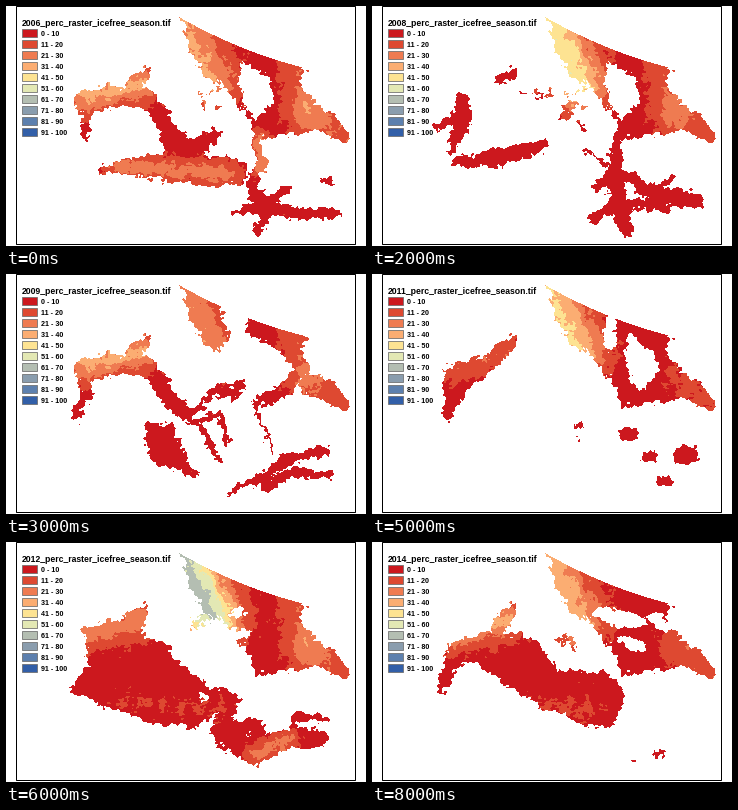
These frames come from a looping animation (360 px wide and 240 px high, 9 s). A matplotlib script:

```python
import numpy as np
import matplotlib.pyplot as plt
from matplotlib.animation import FuncAnimation
from matplotlib.patches import Rectangle
from matplotlib.path import Path

W, H, DPI = 360, 240, 80
PX = 72 / DPI
CLASSES = ["#cc181e", "#de4931", "#ef7b51", "#fbad72", "#fde392",
           "#e3e8b4", "#b4beb2", "#8a9dae", "#5d80ae", "#325fa8"]
PALETTE = np.array([[int(c[i:i + 2], 16) for i in (1, 3, 5)]
                    for c in CLASSES + ["#ffffff"]], dtype=np.uint8)
EMPTY = -1

rng = np.random.default_rng(7)
gx, gy = np.meshgrid(np.arange(W) + 0.5, np.arange(H) + 0.5)


def waves(length, count=24):
    """Smooth noise of unit variance from random plane waves."""
    total = np.zeros(gx.shape)
    for angle, phase in rng.uniform(0, 2 * np.pi, (count, 2)):
        k = 2 * np.pi / (length * rng.uniform(0.7, 1.4))
        total += np.sin(k * (np.cos(angle) * gx + np.sin(angle) * gy) + phase)
    return total * np.sqrt(2 / count)


def rough():
    return 1.0 * waves(26) + 1.0 * waves(11) + 0.8 * waves(5)


# Coasts are simple shapes seen through a rough coordinate grid.
wx, wy = gx + rough(), gy + rough()
cells = np.column_stack([wx.ravel(), wy.ravel()])
mottle = 0.12 * waves(14) + 0.08 * waves(5)
run = gx - 173
swath = (gy > 11) & ((run < 0) | (gy > 11 + 0.566 * run - 0.00128 * run ** 2))
water = np.zeros(gx.shape, dtype=bool)


def nearest(ax_, ay, bx, by):
    """Distance to a segment and the position along it."""
    dx, dy = bx - ax_, by - ay
    t = np.clip(((wx - ax_) * dx + (wy - ay) * dy) / (dx * dx + dy * dy), 0, 1)
    return np.hypot(wx - ax_ - t * dx, wy - ay - t * dy), t


def area(*pts, wet=True):
    water[Path(pts).contains_points(cells).reshape(gx.shape)] = wet


def reach(*spine, wet=True):
    """Channel along points (x, y, width)."""
    for (x0, y0, w0), (x1, y1, w1) in zip(spine, spine[1:]):
        d, t = nearest(x0, y0, x1, y1)
        water[d < (w0 + (w1 - w0) * t) / 2] = wet


def pond(x, y, size, wet=True):
    reach((x - size / 4, y, size), (x + size / 4, y, size), wet=wet)


def scatter(seed, n, x0, y0, x1, y1, size):
    """Short crooked inlets strewn over a box."""
    r = np.random.default_rng(seed)
    for x, y in r.uniform((x0, y0), (x1, y1), (n, 2)):
        dx, dy = r.uniform(-7, 7, 2)
        reach((x, y, size), (x + dx, y + dy, size * 0.7))


# Northern waters
def fan():
    area((172, 6), (214, 24), (221, 62), (212, 80), (197, 70), (185, 42))


def pool():
    area((205, 16), (292, 48), (298, 84), (316, 104), (304, 126), (250, 133),
         (238, 104), (221, 88), (212, 60))


def east():
    reach((304, 110, 18), (322, 118, 22), (338, 131, 9))


def bay(dx=0, dy=0):
    pts = (236, 55), (262, 72), (267, 94), (248, 114), (238, 102), (234, 78)
    area(*[(x + dx, y + dy) for x, y in pts], wet=False)


def north_bay():
    fan(), pool(), east(), bay()
    scatter(3, 5, 192, 80, 220, 114, 4)


def north_arc():
    fan(), east()
    reach((252, 52, 24), (284, 68, 26), (296, 96, 14), (278, 117, 14), (250, 129, 8))
    reach((250, 132, 3), (266, 178, 3))


def north_ring():
    fan(), pool(), east(), bay(20, 4)
    reach((239, 36, 8), (238, 68, 14), wet=False)


def north_full():
    fan(), pool(), east()
    for x, y in ((232, 71), (238, 90), (228, 92)):
        pond(x, y, 9, wet=False)
    scatter(8, 4, 186, 74, 204, 84, 5)


def north_lakes():
    fan(), pool(), east()
    reach((224, 70, 8), (250, 77, 18), (272, 82, 9), wet=False)
    reach((252, 98, 10), (268, 105, 12), wet=False)
    reach((280, 74, 8), (294, 84, 12), wet=False)
    scatter(5, 3, 188, 92, 206, 108, 5)


# Western waters
def arm():
    reach((78, 96, 20), (106, 91, 24), (138, 91, 18), (151, 104, 18),
          (164, 126, 15), (180, 140, 14))
    reach((126, 80, 14), (142, 63, 7))


def west_joined():
    arm()
    reach((82, 106, 10), (78, 131, 8))
    reach((162, 130, 14), (172, 152, 34), (212, 128, 8))
    reach((96, 163, 6), (140, 160, 22), (185, 163, 32), (228, 166, 26))


def west_thin():
    reach((66, 121, 8), (84, 112, 12), (92, 94, 15), (90, 118, 16), (80, 142, 9))
    reach((128, 74, 9), (142, 65, 9))
    reach((83, 157, 9), (125, 151, 17), (170, 140, 13))
    scatter(4, 5, 106, 82, 178, 98, 3)
    scatter(6, 5, 186, 92, 206, 134, 6)


def west_split():
    arm()
    reach((78, 100, 12), (82, 118, 12), (68, 143, 7))
    reach((178, 138, 9), (196, 155, 5))
    area((137, 149), (164, 150), (174, 164), (181, 183), (193, 203), (160, 193),
         (142, 182))
    reach((185, 140, 6), (208, 119, 9), (234, 112, 11), (226, 126, 5))
    reach((190, 148, 5), (214, 138, 6), (220, 168, 5))
    reach((196, 156, 6), (214, 186, 7))


def west_short():
    reach((76, 139, 9), (86, 104, 28), (118, 88, 20), (142, 64, 8))


def west_sea():
    area((64, 148), (82, 125), (77, 87), (112, 77), (124, 70), (140, 61),
         (135, 92), (159, 101), (174, 122), (199, 143), (230, 151), (226, 166),
         (204, 174), (186, 187), (140, 180), (96, 163))
    pond(198, 155, 7, wet=False)


def west_band():
    reach((69, 145, 8), (86, 108, 20), (112, 106, 32), (145, 119, 54),
          (180, 148, 38), (224, 158, 56))
    reach((126, 86, 16), (141, 64, 8))


# Southern waters
def south_delta():
    reach((250, 132, 9), (256, 156, 11), (244, 184, 10), (262, 200, 20))
    reach((228, 207, 6), (256, 201, 11), (290, 207, 13), (330, 208, 8))
    reach((252, 225, 8), (264, 196, 12), (282, 182, 4))
    pond(321, 176, 8)


def south_trunk():
    reach((246, 128, 8), (243, 165, 16), (246, 200, 20), (256, 226, 10))
    reach((225, 183, 8), (245, 163, 9), (280, 187, 17), (324, 195, 17))
    reach((224, 211, 10), (248, 196, 12), (294, 202, 8))
    reach((212, 144, 3), (234, 158, 4))
    reach((278, 187, 6), (302, 170, 5))


def south_thread():
    reach((224, 218, 5), (254, 205, 9), (284, 184, 12), (318, 178, 10))
    reach((260, 213, 12), (286, 198, 8), (324, 201, 8))


def south_islets():
    for x, y, size in ((207, 152, 8), (256, 160, 13), (276, 182, 10),
                       (314, 181, 16), (292, 207, 11), (207, 167, 3)):
        pond(x, y, size)


def south_wide():
    reach((226, 158, 14), (215, 190, 22), (248, 210, 26), (284, 196, 18),
          (314, 196, 18))
    reach((222, 188, 16), (246, 182, 14), (262, 202, 14))
    reach((284, 192, 8), (290, 174, 7), (320, 178, 6))


def south_specks():
    for x, y, size in ((287, 211, 7), (261, 220, 4)):
        pond(x, y, size)


# Where the ice-free season gets longer: segment and reach of the effect.
WARM = {
    "fan": (174, 12, 206, 76, 28),
    "west": (80, 90, 134, 78, 19),
    "rim": (290, 58, 298, 110, 20),
    "east": (306, 102, 336, 130, 20),
    "southwest": (112, 160, 222, 168, 13),
    "strait": (254, 134, 256, 160, 10),
    "south": (250, 212, 282, 198, 11),
}

YEARS = [
    ((north_bay, west_joined, south_delta),
     dict(fan=2.6, west=2.7, rim=1.2, east=1.4, southwest=1.9, strait=2)),
    ((north_bay, west_joined, south_delta),
     dict(fan=3.2, west=1.8, rim=1.2, east=1.2, southwest=1)),
    ((north_bay, west_thin, south_trunk), dict(fan=4.2, rim=1.1, east=1.1)),
    ((north_arc, west_split, south_thread),
     dict(fan=2.2, west=2.7, rim=1.1, east=0.9)),
    ((north_arc, west_short, south_trunk), dict(fan=2.6, west=1.8, rim=0.9)),
    ((north_ring, west_short, south_islets), dict(fan=3.6, west=1.3, east=0.7)),
    ((north_full, west_sea, south_wide),
     dict(fan=5.8, west=2, rim=1.2, east=1.3, southwest=0.5, south=1.8)),
    ((north_lakes, west_sea, south_wide),
     dict(fan=4, west=2.2, rim=0.8, east=1.2, south=1)),
    ((north_lakes, west_band, south_specks),
     dict(fan=3, west=2.7, east=1.3, southwest=0.6)),
]


def render(i):
    parts, warmth = YEARS[i]
    water[:] = False
    for part in parts:
        part()
    season = 0.5 + mottle
    for name, peak in warmth.items():
        *segment, spread = WARM[name]
        season = season + peak * np.exp(-(nearest(*segment)[0] / spread) ** 2)
    level = np.clip(np.floor(season), 0, 9).astype(int)
    return PALETTE[np.where(water & swath, level, EMPTY)]


fig = plt.figure(figsize=(W / DPI, H / DPI), dpi=DPI, facecolor="white")
ax = fig.add_axes([0, 0, 1, 1])
image = ax.imshow(render(0), extent=(0, W, H, 0), interpolation="nearest",
                  aspect="auto")
ax.set(xlim=(0, W), ylim=(H, 0))
ax.axis("off")
ax.add_patch(Rectangle((10, 0), 339, 238, fill=False, ec="black", lw=PX))


def label(x, y, text, size):
    return ax.text(x, y, text, family="Liberation Sans", weight="bold",
                   size=size * PX, va="baseline")


title = label(16, 20, "", 8.6)
for n, color in enumerate(CLASSES):
    top = 23 + 11 * n
    ax.add_patch(Rectangle((16, top), 15, 8, fc=color, ec="#6e6e6e", lw=0.8 * PX))
    label(35, top + 7, f"{10 * n + 1 if n else 0} - {10 * n + 10}", 7.1)


def update(i):
    image.set_data(render(i))
    title.set_text(f"{2006 + i}_perc_raster_icefree_season.tif")
    return image, title


anim = FuncAnimation(fig, update, frames=len(YEARS), interval=1000, repeat=True,
                     repeat_delay=0)
plt.show()
```
